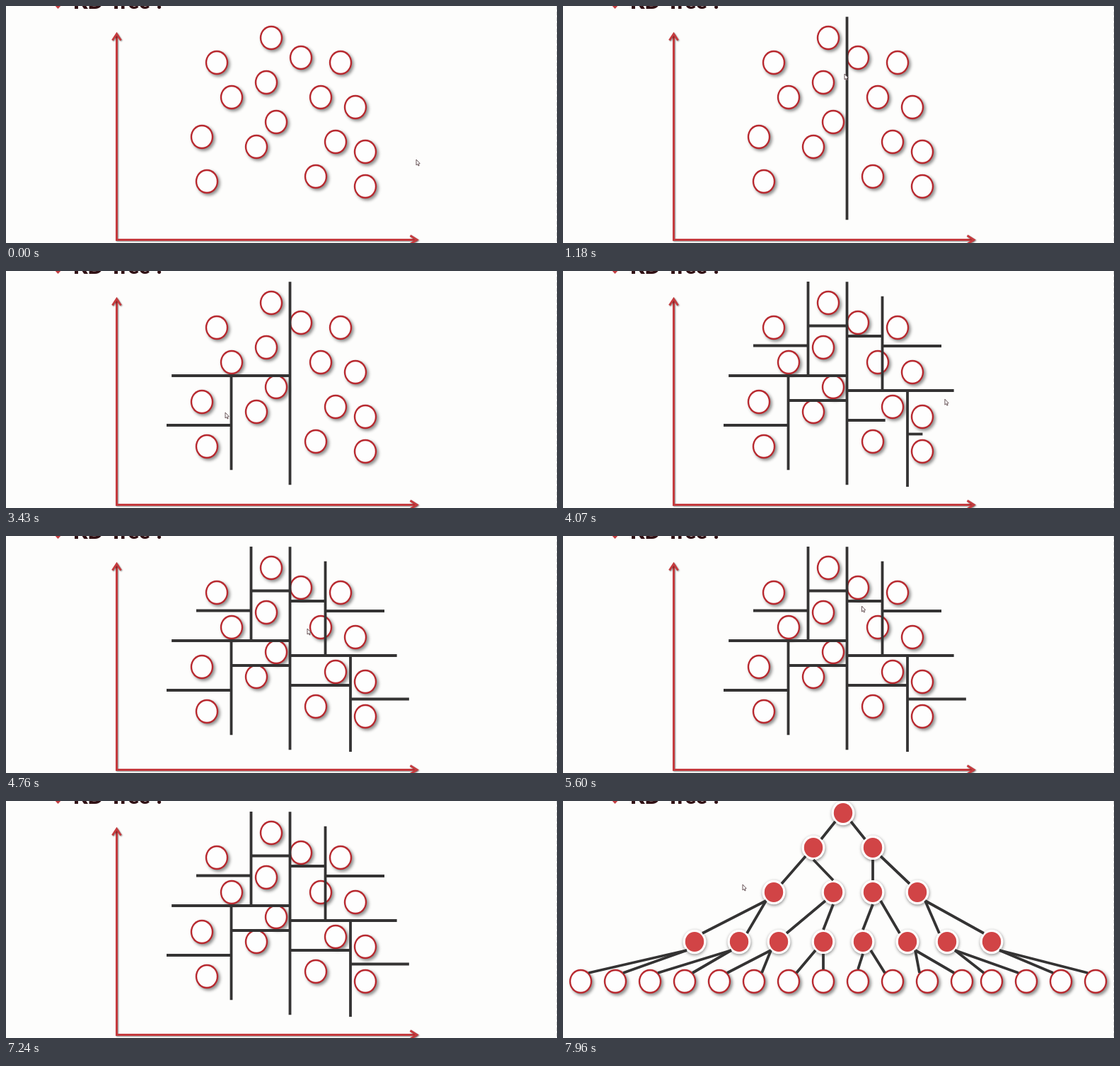
An HTML page with a canvas for the animation above (8 s loop, 779 by 335 pixels).

```html
<!DOCTYPE html>
<html lang="en">
<head>
<meta charset="utf-8">
<title>KD-Tree</title>
<style>
  html, body { margin: 0; width: 100%; height: 100%; overflow: hidden; background: #fdfdfc; }
  canvas { display: block; }
</style>
</head>
<body>
<canvas id="stage" width="779" height="335"></canvas>
<script>
const ctx = document.getElementById('stage').getContext('2d');
const LOOP = 8000, TREE_AT = 7560, WIPE = 120;
const RED = '#b8292f', AXIS = '#c53b3e', NODE = '#d14446', INK = '#343333';

const points = [
  [375, 45], [417, 73], [473, 80], [298, 80], [368, 108], [319, 129], [445, 129], [494, 143],
  [382, 164], [277, 185], [354, 199], [466, 192], [508, 206], [438, 241], [284, 248], [508, 255]
];

// Split coordinates of the binary tree, level by level; even levels split x, odd ones y.
const splits = [401.5, 148, 169, 346.5, 318.5, 451.5, 487, 105.5, 77.5, 218, 183, 92, 106, 211, 230.5];
const firstBranch = [0, 1, 4, 9];

// Where cuts with an open end stop.
const outline = {
  top: x => Math.max(15, 36 - 0.41 * (452 - x)),
  bottom: x => Math.min(305, 281 + 0.253 * (x - 318)),
  left: y => Math.max(227, 269 - 0.82 * (y - 105.5)),
  right: y => 535 + 0.28 * (y - 106)
};

function buildCuts(i = 0, cell = {}, upright = true) {
  if (i >= splits.length) return [];
  const at = splits[i];
  const [lo, hi, before, after] = upright
    ? ['top', 'bottom', 'right', 'left']
    : ['left', 'right', 'bottom', 'top'];
  const from = cell[lo] ?? outline[lo](at), to = cell[hi] ?? outline[hi](at);
  return [
    { i, line: upright ? [at, from, at, to] : [from, at, to, at] },
    ...buildCuts(2 * i + 1, { ...cell, [before]: at }, !upright),
    ...buildCuts(2 * i + 2, { ...cell, [after]: at }, !upright)
  ];
}

// One branch is explained slowly, the rest follows quickly.
const cuts = buildCuts();
let quick = 0;
for (const cut of cuts) {
  const step = firstBranch.indexOf(cut.i);
  cut.start = step < 0 ? 3590 + 45 * quick++ : 860 + 730 * step;
}

const row = (n, place) => Array.from({ length: n }, (_, i) => place(i));
const levels = [
  { y: 17, xs: [396] },
  { y: 66, xs: [354, 438] },
  { y: 129, xs: [298, 382, 438, 501] },
  { y: 199, xs: row(8, i => 186 + 7 * Math.round(60 * i / 7)) },
  { y: 255, xs: row(16, i => 25 + 49 * i - (i > 11 ? 7 : 0)) }
];

// time, x, y of the pointer tip
const path = [
  [0, 580, 217], [230, 580, 217], [1130, 398, 96], [1260, 398, 96], [1700, 640, 150],
  [2320, 316, 160], [3400, 310, 200], [3590, 310, 200], [3900, 560, 190],
  [4600, 426, 131], [4990, 426, 131], [6200, 419, 68], [6550, 419, 68],
  [7560, 330, 140], [7900, 254, 118], [LOOP, 254, 118]
];

const clamp = v => Math.max(0, Math.min(1, v));
const mix = (a, b, k) => a + (b - a) * k;

function stroke(color, width, ...xy) {
  ctx.strokeStyle = color;
  ctx.lineWidth = width;
  ctx.beginPath();
  for (let i = 0; i < xy.length; i += 2) ctx.lineTo(xy[i], xy[i + 1]);
  ctx.stroke();
}

function disc(x, y, rx, ry, color) {
  ctx.fillStyle = color;
  ctx.beginPath();
  ctx.ellipse(x, y, rx, ry, 0, 0, Math.PI * 2);
  ctx.fill();
}

function shadow(dx, dy, blur, alpha) {
  ctx.shadowColor = `rgba(0,0,0,${alpha})`;
  ctx.shadowOffsetX = dx;
  ctx.shadowOffsetY = dy;
  ctx.shadowBlur = blur;
}

function ring(x, y) {
  ctx.save();
  shadow(2.5, 2.5, 4, 0.45);
  disc(x, y, 16.2, 17.2, RED);
  ctx.restore();
  disc(x, y, 13.8, 14.8, '#fefefe');
}

function node(x, y) {
  ctx.save();
  shadow(0.5, 1.5, 4, 0.45);
  disc(x, y, 16.5, 17.2, '#fff');
  ctx.restore();
  disc(x, y, 13.2, 14, NODE);
}

function drawTitle() {
  ctx.fillStyle = AXIS;
  ctx.beginPath();
  ctx.moveTo(67, -3);
  ctx.lineTo(73.5, 4);
  ctx.lineTo(80, -3);
  ctx.fill();
  ctx.fillStyle = '#301014';
  ctx.font = '900 29px Lato, sans-serif';
  ctx.fillText('KD-Tree ?', 95, 3.5);
}

function drawAxes() {
  ctx.save();
  shadow(1, 1, 2, 0.45);
  stroke(AXIS, 3, 156.5, 40, 156.5, 330.5, 580, 330.5);
  stroke(AXIS, 3, 150.5, 48.5, 156.5, 39.5, 162.5, 48.5);
  stroke(AXIS, 3, 571.5, 324.5, 581, 330.5, 571.5, 336.5);
  ctx.restore();
}

function drawPlot(t) {
  drawAxes();
  points.forEach(([x, y]) => ring(x, y));
  for (const { start, line: [x1, y1, x2, y2] } of cuts) {
    const k = clamp((t - start) / WIPE);
    if (k > 0) stroke(INK, 3.8, x1, y1, mix(x1, x2, k), mix(y1, y2, k));
  }
}

// Edges join the rims straight above and below, or at the diagonals when they lean.
function edge(x1, y1, x2, y2) {
  const dx = x2 - x1, leans = Math.abs(dx) >= (y2 - y1) / 2;
  const sx = leans ? 11 * Math.sign(dx) : 0, sy = leans ? 12 : 17;
  stroke(INK, 3.8, x1 + sx, y1 + sy, x2 - sx, y2 - sy);
}

function drawTree() {
  levels.forEach(({ y, xs }, depth) => {
    const paint = depth < levels.length - 1 ? node : ring;
    xs.forEach(x => paint(x, y));
  });
  levels.slice(1).forEach(({ y, xs }, depth) => {
    const parent = levels[depth];
    xs.forEach((x, i) => edge(parent.xs[i >> 1], parent.y, x, y));
  });
}

function drawPointer(t) {
  if (t >= 6860 && t < TREE_AT) return;
  const i = path.findIndex(p => p[0] > t);
  const [t0, x0, y0] = path[i - 1], [t1, x1, y1] = path[i];
  const u = (t - t0) / (t1 - t0), k = u * u * (3 - 2 * u);
  ctx.save();
  ctx.translate(mix(x0, x1, k), mix(y0, y1, k));
  ctx.beginPath();
  [[0, 0], [0, 8], [1.8, 6.4], [3, 9], [4.2, 8.4], [3.1, 6], [5.2, 5.6]]
    .forEach(([x, y]) => ctx.lineTo(x, y));
  ctx.closePath();
  ctx.fillStyle = '#fff';
  ctx.fill();
  ctx.strokeStyle = '#5a4448';
  ctx.lineWidth = 0.9;
  ctx.stroke();
  ctx.restore();
}

function draw(t) {
  ctx.fillStyle = '#fdfdfc';
  ctx.fillRect(0, 0, 779, 335);
  ctx.setLineDash([5, 3]);
  stroke('#dedede', 1, 778.5, 0, 778.5, 335);
  ctx.setLineDash([]);
  drawTitle();
  if (t < TREE_AT) drawPlot(t);
  else drawTree();
  drawPointer(t);
}

const begin = performance.now();
function tick() {
  draw((performance.now() - begin) % LOOP);
  requestAnimationFrame(tick);
}
tick();
</script>
</body>
</html>
```
